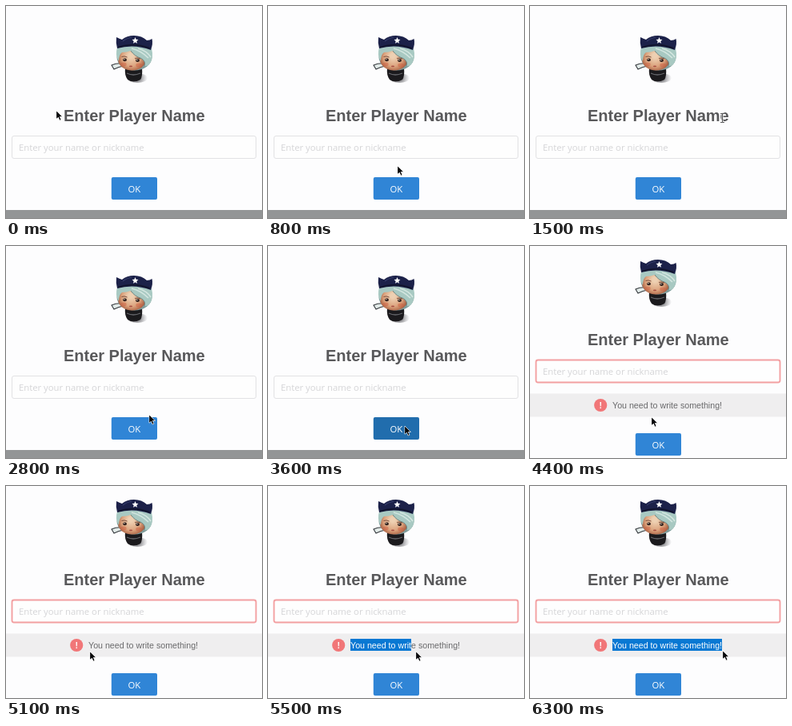
Recreate the animation shown at these times as an HTML page with a canvas. Size 320x265 px, loop 6400 ms.

```html
<!DOCTYPE html>
<html lang="en">
<head>
<meta charset="utf-8">
<title>Enter Player Name</title>
<style>
html, body { margin: 0; width: 100%; height: 100%; overflow: hidden; background: #fdfdfe; }
canvas { display: block; width: 320px; height: 265px; }
</style>
</head>
<body>
<canvas id="stage"></canvas>
<script>
const canvas = document.getElementById('stage');
const c = canvas.getContext('2d');
const dpr = window.devicePixelRatio || 1;
canvas.width = 320 * dpr;
canvas.height = 265 * dpr;

const LOOP = 6400, STEP = 100;
const PRESS = 3400, INVALID = 3700, DRAG = 5300;
const SANS = '"Open Sans", "Noto Sans", sans-serif';
const ARIAL = '"Liberation Sans", Arial, sans-serif';
const MESSAGE = 'You need to write something!';
const MESSAGE_FONT = '10.66px ' + ARIAL;

// Pointer stops: time, x, y
const PATH = [
  [400, 63, 131], [700, 118, 168], [900, 205, 232], [1100, 249, 244],
  [1200, 300, 249], [1300, 272, 205], [1400, 196, 152], [1500, 240, 140],
  [1900, 240, 140], [2200, 216, 160], [2400, 168, 181], [2600, 157, 195],
  [2800, 179, 211], [3100, 180, 221], [3300, 171, 225], [4100, 170, 225],
  [4400, 152, 214], [4700, 112, 221], [4900, 112, 221], [5200, 101, 200],
  [5300, 110, 201], [5400, 178, 206], [5500, 185, 207], [5600, 226, 207],
  [5900, 150, 206], [6200, 239, 206], [6300, 241, 206]
];

function pointerAt(t) {
  if (t <= PATH[0][0]) return { x: PATH[0][1], y: PATH[0][2] };
  const i = PATH.findIndex(p => p[0] >= t);
  const [t0, x0, y0] = PATH[i - 1], [t1, x1, y1] = PATH[i];
  const k = (t - t0) / (t1 - t0);
  return { x: x0 + (x1 - x0) * k, y: y0 + (y1 - y0) * k };
}

function inside(p, x, y, w, h) {
  return p.x >= x && p.x <= x + w && p.y >= y && p.y <= y + h;
}

function rounded(x, y, w, h, r) {
  c.beginPath();
  c.roundRect(x, y, w, h, r);
}

function shape(d, fill, stroke, width = 1) {
  const p = new Path2D(d);
  if (fill) { c.fillStyle = fill; c.fill(p); }
  if (stroke) { c.strokeStyle = stroke; c.lineWidth = width; c.stroke(p); }
}

function oval(x, y, rx, ry, fill) {
  c.beginPath();
  c.ellipse(x, y, rx, ry, 0, 0, Math.PI * 2);
  c.fillStyle = fill;
  c.fill();
}

function label(str, x, y, font, fill, align = 'left') {
  c.font = font;
  c.textAlign = align;
  c.fillStyle = fill;
  c.fillText(str, x, y);
}

function star(x, y, r) {
  c.beginPath();
  for (let i = 0; i < 10; i++) {
    const a = i * Math.PI / 5 - Math.PI / 2, d = i % 2 ? r * 0.45 : r;
    c.lineTo(x + d * Math.cos(a), y + d * Math.sin(a));
  }
  c.fillStyle = '#fff';
  c.fill();
}

function avatar() {
  const shadow = c.createRadialGradient(164, 90, 2, 164, 90, 13);
  shadow.addColorStop(0, 'rgba(70,70,75,.75)');
  shadow.addColorStop(1, 'rgba(120,120,125,0)');
  oval(164, 90, 13, 6, shadow);
  // body
  shape('M149 77 H170 Q171 88 168 92 Q159 97 152 92 Q148 87 149 77Z', '#1b1a1d');
  shape('M151 84 Q159 88 168 84', null, '#66666b', 1.3);
  // scarf tail
  shape('M146 72 Q138 71 132 74 L135 79 Q141 76 147 75Z', '#e2eae8', '#33383c', 1.1);
  // head
  oval(160.5, 64, 22, 16.5, '#7f9c9a');
  const skin = c.createRadialGradient(156, 62, 3, 157, 65, 18);
  skin.addColorStop(0, '#eed0b2');
  skin.addColorStop(0.6, '#dba27c');
  skin.addColorStop(1, '#a4583b');
  oval(157.5, 66.5, 17.5, 14, skin);
  oval(147, 73, 3.6, 2.4, 'rgba(205,95,65,.5)');
  oval(166, 74, 3.8, 2.4, 'rgba(205,95,65,.5)');
  // hair
  shape('M139 52 Q160 46 182 53 Q185 65 179 73 Q175 76 173 75 Q175 69 168 65 Q160 62 156 56 Q151 58 145 58 Q141 61 141 69 Q136 61 139 52Z', '#a8c9c2');
  shape('M157 53 Q169 56 178 65 M165 53 Q176 56 181 64', null, '#d3e6e0', 1.7);
  shape('M156 56 Q161 63 169 65.5 Q175 69 173 75', null, '#64817f', 0.9);
  // face
  shape('M144.5 63.5 Q148 62 151.5 64 M161 65.5 Q164 64 168 66', null, '#6d4030', 0.9);
  oval(148.5, 67.2, 2.4, 2, '#33231f');
  oval(164.5, 68, 2.5, 2.1, '#33231f');
  oval(147.8, 66.6, 0.7, 0.7, '#f4e8dc');
  oval(163.8, 67.4, 0.7, 0.7, '#f4e8dc');
  oval(156, 75.3, 2.1, 0.9, '#a84f43');
  // cap
  shape('M139 53 Q137 46 138 39 Q142 41 145 42 Q151 37 160 37 Q170 37 176 43 Q180 43 182.5 41 Q184 47 181 55 Q160 47 139 53Z', '#1c2149');
  shape('M140 51.5 Q160 45 180 53', null, '#11142c', 1.8);
  shape('M146 44 Q152 39.5 157 39.5', null, '#353c6b', 1.2);
  star(161.5, 43.3, 4.2);
}

function field(t) {
  const k = Math.max(0, Math.min(1, (t - INVALID + STEP) / 300));
  const mix = (a, b) => Math.round(a + (b - a) * k);
  const red = t < INVALID ? 0 : k;
  rounded(7.5, 162.5, 305, 28, 2.5);
  c.fillStyle = '#fefefe';
  c.fill();
  c.strokeStyle = red ? `rgb(${mix(226, 243)},${mix(226, 160)},${mix(228, 162)})` : '#e2e2e4';
  c.lineWidth = 1 + 0.9 * red;
  c.stroke();
  label('Enter your name or nickname', 16, 181, '11.3px ' + SANS, '#d5d5d7');
}

function button(y, fill) {
  rounded(131.8, y, 57.2, 28, 2);
  c.fillStyle = fill;
  c.fill();
  label('OK', 160.3, y + 18.5, '500 11.3px ' + SANS, '#fff', 'center');
}

function selectedWidth(t) {
  if (t <= DRAG) return 0;
  const reach = pointerAt(t - STEP).x - 103;
  c.font = MESSAGE_FONT;
  let width = 0;
  for (let i = 1; i <= MESSAGE.length; i++) {
    const next = c.measureText(MESSAGE.slice(0, i)).width;
    if ((width + next) / 2 > reach) break;
    width = next;
  }
  return width;
}

function warning(t) {
  c.fillStyle = '#efeeef';
  c.fillRect(0, 184.5, 320, 29);
  oval(88.2, 199, 8.1, 8.1, '#f17678');
  label('!', 88.2, 202.6, 'bold 10.5px ' + ARIAL, '#fff', 'center');
  label(MESSAGE, 103, 202.5, MESSAGE_FONT, '#69696b');
  const w = selectedWidth(t);
  if (!w) return;
  c.save();
  c.beginPath();
  c.rect(103, 191, w, 15);
  c.clip();
  c.fillStyle = '#0878d3';
  c.fillRect(103, 191, w, 15);
  label(MESSAGE, 103, 202.5, MESSAGE_FONT, '#fff');
  c.restore();
}

function pointer(p, beam) {
  c.save();
  c.translate(Math.round(p.x), Math.round(p.y));
  c.lineJoin = 'round';
  if (beam) {
    const bar = 'M-2 -5.5 H3 M.5 -5 V5 M-2 5.5 H3';
    shape(bar, null, 'rgba(255,255,255,.8)', 2.4);
    shape(bar, null, '#4a4a4c', 0.9);
  } else {
    shape('M0 0 V10.2 L2.4 8 L4.1 12 L5.9 11.2 L4.2 7.4 H7.4Z', '#08080a', '#fff', 0.8);
    shape('M.3 .8 V9.4 L2.6 7.4 L4.4 11.4 L5.3 11 L3.6 7 H6.6Z', '#08080a');
  }
  c.restore();
}

function draw(t) {
  const invalid = t >= INVALID;
  const lift = invalid ? 20 : 0;
  const p = pointerAt(t);
  c.setTransform(dpr, 0, 0, dpr, 0, 0);
  c.fillStyle = '#fdfdfe';
  c.fillRect(0, 0, 320, 265);

  c.save();
  c.translate(0, -lift);
  avatar();
  label('Enter Player Name', 160.3, 143.7, 'bold 20px ' + ARIAL, '#58585a', 'center');
  field(t);
  c.restore();

  const top = invalid ? 234 : 214;
  const hover = inside(p, 131, top, 58, 28);
  const pressed = t >= PRESS && !invalid;
  button(top, pressed ? '#216dad' : hover ? '#2b78c1' : '#3085d6');

  if (invalid) {
    warning(t);
  } else {
    c.fillStyle = '#939596';
    c.fillRect(0, 255, 320, 10);
  }

  const beam = inside(p, 71, 127 - lift, 178, 22) ||
    inside(p, 7, 162 - lift, 306, 29) ||
    (invalid && inside(p, 102, 192, 139, 13));
  pointer(p, beam);
}

const start = performance.now();
function tick(now) {
  const t = Math.max(0, now - start) % LOOP;
  draw(Math.floor(t / STEP) * STEP);
  requestAnimationFrame(tick);
}
draw(0);
requestAnimationFrame(tick);
</script>
</body>
</html>
```
